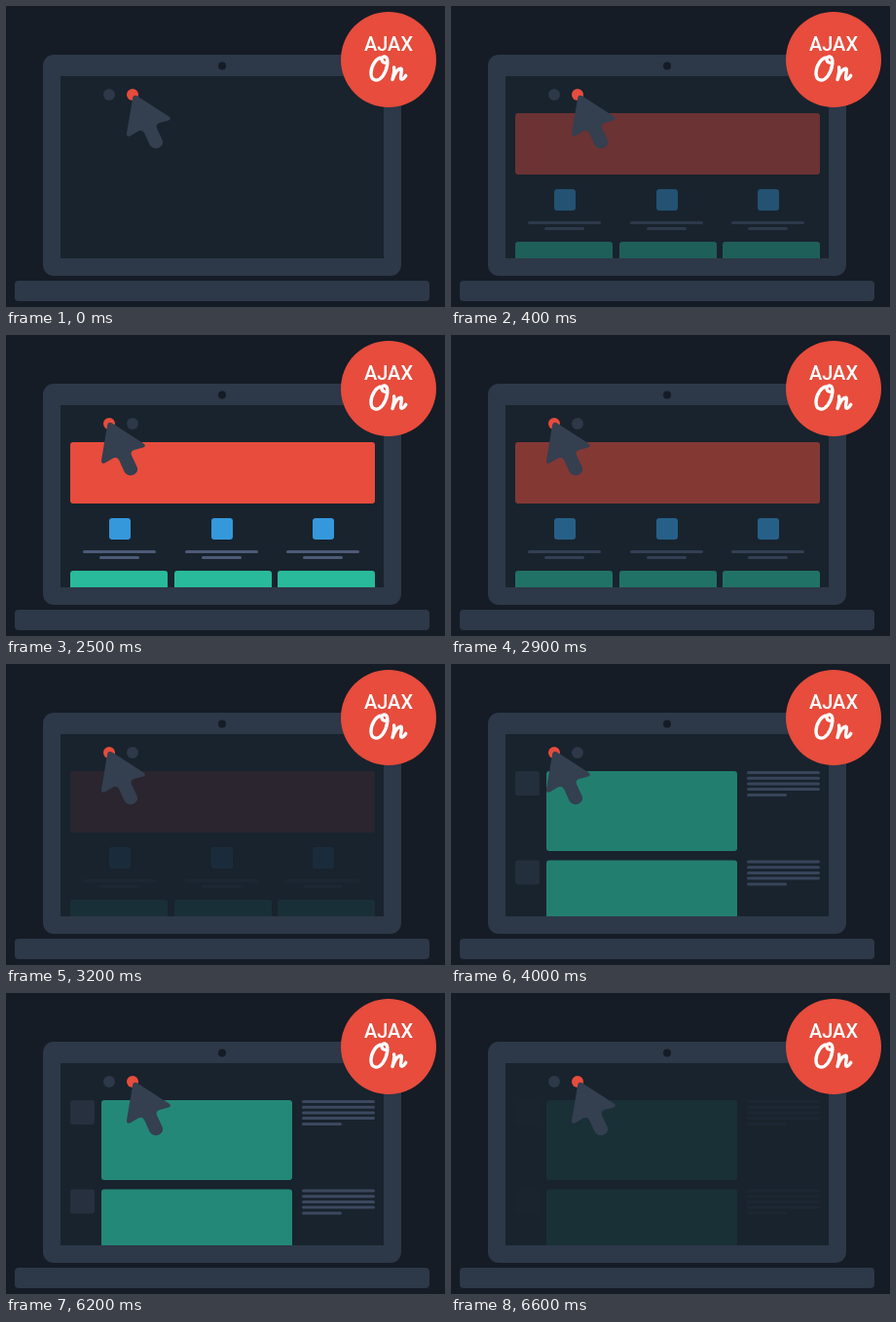
These frames come from a looping animation (451 by 309 pixels, 7 s). An HTML page:

```html
<!DOCTYPE html>
<html lang="en">
<head>
<meta charset="utf-8">
<title>AJAX On</title>
<style>
  html, body { margin: 0; width: 100%; height: 100%; overflow: hidden; background: #151c26; }
  svg { display: block; width: 100%; height: 100%; }
  .frame { fill: #2d3848; }
  .screen { fill: #19232d; }
  .red { fill: #e74c3c; }
  .blue { fill: #3498db; }
  .green { fill: #29ba9c; }
  .line { fill: #4d5b78; }
  .pointer { fill: #343f50; }
  .label { fill: #fff; font: 500 20px Roboto, sans-serif; text-anchor: middle; }
  .script { fill: none; stroke: #fff; stroke-width: 3.4; stroke-linecap: round; stroke-linejoin: round; }
</style>
</head>
<body>
<svg viewBox="0 0 451 309">
  <defs>
    <clipPath id="view"><rect x="56" y="72" width="332" height="187"/></clipPath>
    <g id="feature">
      <rect class="blue" x="27" y="188" width="22" height="22" rx="3"/>
      <rect class="line" y="221" width="75" height="3" rx="1.5"/>
      <rect class="line" x="17" y="227" width="41" height="3" rx="1.5"/>
    </g>
    <g id="post">
      <rect class="frame" x="66" width="25" height="25" rx="3"/>
      <rect class="green" x="98" width="196" height="82" rx="3"/>
      <g class="line">
        <rect x="304" width="75" height="3" rx="1.5"/>
        <rect x="304" y="5.7" width="75" height="3" rx="1.5"/>
        <rect x="304" y="11.4" width="75" height="3" rx="1.5"/>
        <rect x="304" y="17.1" width="75" height="3" rx="1.5"/>
        <rect x="304" y="22.9" width="41" height="3" rx="1.5"/>
      </g>
    </g>
  </defs>

  <rect class="frame" x="38" y="50" width="368" height="227" rx="11"/>
  <rect class="screen" x="56" y="72" width="332" height="187"/>
  <circle cx="222" cy="61.5" r="4" fill="#151c26"/>
  <rect class="frame" x="9" y="282" width="426" height="21" rx="4"/>

  <g clip-path="url(#view)">
    <g id="home">
      <rect class="red" x="66" y="110" width="313" height="63" rx="3"/>
      <use href="#feature" x="79"/>
      <use href="#feature" x="184"/>
      <use href="#feature" x="288"/>
      <g class="green">
        <rect x="66" y="242" width="100" height="40" rx="3"/>
        <rect x="173" y="242" width="100" height="40" rx="3"/>
        <rect x="279" y="242" width="100" height="40" rx="3"/>
      </g>
    </g>
    <g id="blog">
      <use href="#post" y="110"/>
      <use href="#post" y="201.5"/>
    </g>
  </g>

  <circle id="leftDot" cx="106" cy="91" r="6"/>
  <circle id="rightDot" cx="130" cy="91" r="6"/>
  <path id="pointer" class="pointer" d="M130.2 94 Q131.4 90.6 135 92.6
    L167.5 113.6 Q170.6 116 167 117.4 L157.5 120 Q153.4 121.6 155 125.4
    L160.6 137.6 C162.6 142 158.6 146.2 153.6 146.2 Q149.4 146 147.4 142
    L142.2 130.6 Q140.4 126.6 136.4 128.2 L127.4 133.4 Q123.6 134.8 124 130.6 Z"/>

  <circle class="red" cx="393" cy="55" r="49"/>
  <text class="label" x="393" y="46">AJAX</text>
  <g class="script" role="img" aria-label="On">
    <path d="M387 53 C380 52.5 375 62 375 69 C375 77 382 78.5 387 72
      C392 65 394 53 389 52 C384.5 51.5 384.5 59 392 58.5"/>
    <path d="M398.6 63 C399.6 67 397.6 72 397 75.6 C399 70 402.4 64.4 405.4 64.2
      C408.4 64.6 403.6 74.6 406.4 75.2 C408.2 75.4 409.6 73.4 410.8 71.4"/>
  </g>
</svg>
<script>
  const LOOP = 7000;
  const [home, blog, leftDot, rightDot, pointer] =
    ["home", "blog", "leftDot", "rightDot", "pointer"].map(id => document.getElementById(id));

  const clamp = v => Math.min(1, Math.max(0, v));

  // Number of discrete steps taken since start, the first one at start itself
  const stepsSince = (t, start, every, max) =>
    Math.min(max, Math.max(0, Math.floor((t - start) / every) + 1));

  const fadeOut = (t, start, max) => clamp(0.966 - 0.146 * stepsSince(t, start, 100, max));

  const homeOpacity = t => t < 2700
    ? clamp(0.15 * stepsSince(t, 200, 100, 7) - 0.05)
    : fadeOut(t, 2700, 7);

  const blogOpacity = t => t < 6100
    ? clamp(0.143 * stepsSince(t, 3600, 100, 8) - 0.103)
    : fadeOut(t, 6100, 6);

  const ease = p => p * p * (3 - 2 * p);

  // 0 = over the right dot, 1 = over the left dot
  const pointerProgress = t => t < 5300
    ? ease(stepsSince(t, 1800, 50, 9) / 9)
    : 1 - ease(stepsSince(t, 5300, 50, 10) / 10);

  function draw(t) {
    home.setAttribute("opacity", homeOpacity(t));
    blog.setAttribute("opacity", blogOpacity(t));

    const onLeft = t >= 2500 && t < 5800;
    leftDot.setAttribute("class", onLeft ? "red" : "frame");
    rightDot.setAttribute("class", onLeft ? "frame" : "red");

    const u = pointerProgress(t);
    const x = -26 * u;
    const y = 34 * u * (1 - u) - 2 * u * u;
    pointer.setAttribute("transform", `translate(${x} ${y})`);
  }

  const start = performance.now();
  function tick() {
    draw((performance.now() - start) % LOOP);
    requestAnimationFrame(tick);
  }
  tick();
</script>
</body>
</html>
```
